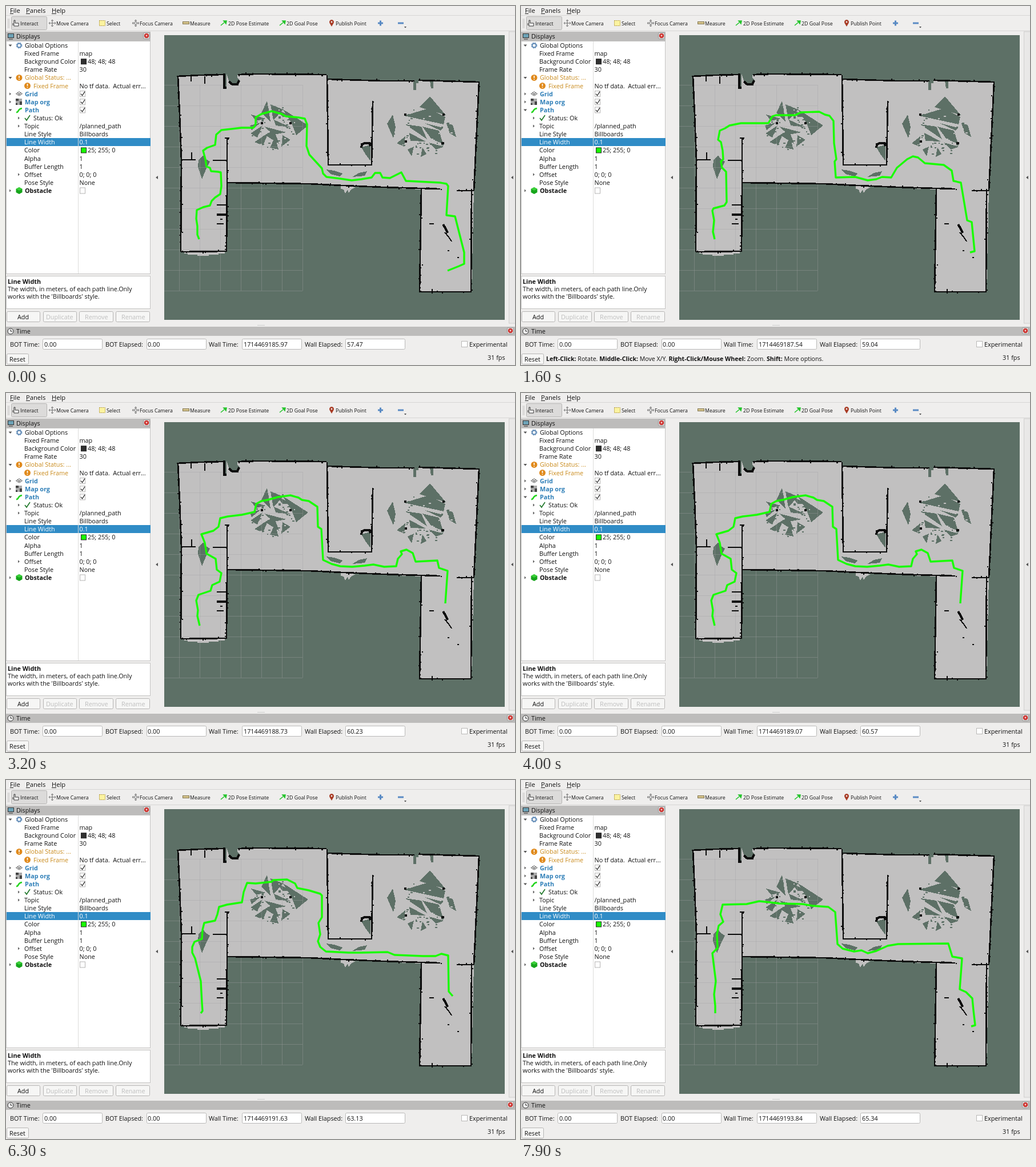
Recreate the animation shown at these times as an HTML page. Size 891x628 px, loop 8 s.

```html
<!DOCTYPE html>
<html lang="en">
<head>
<meta charset="utf-8">
<title>Planner view</title>
<style>
html, body { margin: 0; width: 100%; height: 100%; overflow: hidden; background: #efeeed; }
svg { display: block; }
text { font: 10.8px "Open Sans", "Noto Sans", sans-serif; fill: #111; white-space: pre; }
.tool { font-size: 8.8px; }
.b { font-weight: 700; }
.display { font-weight: 700; fill: #2f7fb8; }
.warn { fill: #c98a1b; }
.off { fill: #bebebe; }
.sel { fill: #fff; }
#floor { fill: #c1c0c0; }
#holes, .hole { fill: #5d7066; }
#walls path { fill: none; stroke: #0b0b0b; stroke-width: 2.6; }
#walls .thin { stroke-width: 2; }
#paths path { fill: none; stroke: #19ff00; stroke-width: 3.4; stroke-linejoin: round; visibility: hidden; }
</style>
</head>
<body>
<svg id="stage" width="891" height="628" viewBox="0 0 891 628">
<g id="ui"></g>
<rect x="277" y="51" width="596" height="498" fill="#5d7066"/>
<g shape-rendering="crispEdges">
  <g id="floor">
    <path d="M300 122L380 120V144H386V119L561 119L563 127L660 130L829 133L819 322L815 500H724L727 321L590 315L530 311L387 310L386 430H306L307 270Z"/>
    <path d="M312 430H383V433H372V435H355V437H335V435H318V433H312Z"/>
    <path d="M586 314L612 317L604 321L600 327L598 321L594 328L591 321L586 320Z"/>
  </g>
  <g id="holes">
    <path d="M386 118H406L405 125L409 130L404 138L396 137L390 131Z"/>
    <path d="M345 261L350 268L357 272L350 286L343 303L336 281L337 270Z"/>
    <path d="M560 286L574 288L589 293L584 298L568 294ZM632 289L628 297L606 299L618 292ZM622 247L638 243V271L629 259Z"/>
    <path d="M713 130H722V135H718V147H713ZM742 130H748V144H744Z"/>
    <path d="M457 166L463 202L447 187ZM463 172L485 181L468 200ZM474 180L502 195L484 194ZM484 180L529 209L508 226L500 205ZM429 190L455 197L438 201ZM427 209L446 204L430 217ZM428 223L449 209L440 230ZM452 211L491 221L468 225ZM454 226L469 216L478 241ZM469 199L498 212L472 209ZM435 238L459 222L450 244ZM462 248L471 229L477 251ZM482 246L484 226L498 234Z"/>
    <path d="M697 192L740 179L769 194L766 207ZM724 177L742 158L770 191ZM667 206L677 190L682 212L678 231ZM699 207L727 211L737 233ZM706 222L735 237L708 236ZM729 211L758 218L765 241L745 233ZM733 205L765 213L761 218ZM771 205L782 208L788 229L777 223ZM740 239L767 246L752 251ZM684 240L699 228L697 246ZM703 251L714 246L710 263ZM726 264L729 247L736 259Z"/>
  </g>
  <g id="specks"></g>
  <g id="grid" stroke="#a0a0a4" stroke-opacity=".38"></g>
  <g id="walls">
    <path d="M299 123L340 121L380 120M406 120L440 119L561 120"/>
    <path d="M301 122L304 190L307 270L306 430"/>
    <path d="M306 430L386 429"/>
    <path d="M387 230V310L386 430"/>
    <path d="M387 309L530 311L590 314L660 317L760 320"/>
    <path d="M562 121L564 278H640L642 166"/>
    <path d="M563 128L660 131H715M722 130L829 133"/>
    <path d="M828 133L819 323"/>
    <path d="M789 323H819"/>
    <path d="M727 320L724 500H814L815 323"/>
    <path class="thin" d="M348 123V136M324 123V132M325 256V269M306 269H332M362 270H387M369 348H386M369 381H381M375 373H379M383 231H391M741 381H749M746 495V500"/>
    <path style="stroke-width:4" d="M382 118V143H386M369 365H386M390 132L396 137H405L408 130"/>
    <path style="stroke-width:4" d="M622 248L623 242L628 240H636L638 245"/>
    <path style="stroke-width:4" d="M765 382L770 390L773 397"/>
    <path class="thin" d="M768 396L775 404L780 412M773 428H776M790 440H793M728 453H730M588 314H600V318"/>
    <path style="stroke-width:4" d="M446 205H450M496 205H500M697 190H701M764 190H768M698 237H702M762 240H767"/>
  </g>
</g>
<g id="paths">
  <path d="M338 408L335 400V385L333 372L334 357L345 352L357 349L360 341L366 335L375 329L377 315L376 291L371 290L359 289L357 283L351 281L349 268L345 253L352 248L366 243L368 225L377 217L395 215L412 213H433L437 207V195L447 189L465 184L483 189L490 193L512 195L523 197L527 207L526 245L531 260L553 284L555 293L561 299L585 302L605 305L622 303L640 300L646 292H655L659 300L672 301L692 291L700 306L760 309L771 311L774 315L771 366L786 368L802 431V451L793 455L773 463"/>
  <path d="M339 408L336 395L338 375L335 358L337 354L356 349L360 343L359 290L352 283L350 272L354 268L353 253L350 238L345 234L348 218L357 214L365 209L385 205H433L440 193L446 191H480L490 186L522 185L532 190L540 192L547 201L548 240L552 268L549 272L551 300L585 299L607 305L622 303L632 299L648 300L658 283L676 268L686 263L695 265L707 275L740 278L754 288L757 306L770 309L781 375L789 378L794 429L786 431"/>
  <path d="M339 407L335 390L336 372L335 350L344 343L342 320L339 300L332 283L342 278L344 262L342 252L349 246L355 241L373 236L374 217L385 212L411 209L436 214L447 219L470 216L481 221L486 239L488 245L495 254L517 260L530 265L557 291L565 300L585 303L597 299L607 305L622 303L634 296L645 293L667 284L683 273L693 259L705 251L717 250L735 261L759 269L767 300L770 318L768 360L775 365L777 375L790 379L793 428L787 431"/>
  <path d="M339 407L335 390L336 380L333 363L337 353L358 346L361 336L374 330L377 315L369 309L367 290L351 281L348 262L342 247L363 241L372 234L375 219L388 216L413 213L435 208L438 194L447 189L458 187L476 182L498 179L512 183L518 187L530 189L545 199L546 234L552 238L555 292L570 299L585 303L606 304L628 302L643 300L662 304L683 303L686 290L693 282L691 277L701 274L712 280L717 295L755 293L758 306L773 311L769 368"/>
  <path d="M338 407V380L339 363L345 352L339 330V315L337 300L349 292L352 262L349 240L341 230V215L349 200L364 197L400 196L437 194L450 190L467 191L471 200L470 232L485 237L492 246L517 258L537 270L550 274L556 287L571 299L591 296L607 291L630 292L655 299L665 288L673 275L685 263L718 264L725 279L765 278L778 287L780 378L789 381V398"/>
  <path d="M341 408L344 404L343 390L341 352L331 312L326 302V292L330 283L343 278L344 262L347 250L366 246L370 235L373 222L387 218L413 214L416 196L422 180L437 181L465 178L468 175L492 174L506 181L510 189L530 193L550 199L553 202V240L547 250L550 270L546 282L550 292L560 300L600 302H622L668 301L680 306L730 308H752L762 304L774 307L775 370L782 378"/>
  <path d="M340 408V395L338 375L341 352L337 320L335 303L344 294L343 270L346 255L354 248L349 235L353 218L395 217L417 212L436 214L452 216L493 217L510 220L538 222L550 231L554 287L563 295L583 300L596 298L607 303L622 299L642 290L660 287L748 286L755 309L772 312L768 366L779 371L790 382L792 403L795 429L788 431"/>
</g>
</svg>
<script>
const $ = id => document.getElementById(id);
const ui = $('ui');

function add(parent, tag, attrs, content) {
  const el = document.createElementNS('http://www.w3.org/2000/svg', tag);
  for (const k in attrs) el.setAttribute(k, attrs[k]);
  if (content) el.textContent = content;
  return parent.appendChild(el);
}
const text = (x, mid, s, cls = '') => add(ui, 'text', { x, y: mid + 4, class: cls }, s);
const rect = (x, y, width, height, fill, stroke = 'none', rx = 0) =>
  add(ui, 'rect', { x, y, width, height, fill, stroke, rx });
const shape = (d, fill, stroke = 'none', width = 1) =>
  add(ui, 'path', { d, fill, stroke, 'stroke-width': width });
const dot = (cx, cy, r, fill, stroke = 'none') => add(ui, 'circle', { cx, cy, r, fill, stroke });

const tick = (x, y) => shape(`M${x} ${y}l2.5 3 4.5 -7`, 'none', '#333', 1.3);
const button = (x, y, w, h, label, cls, lx) => {
  rect(x + .5, y + .5, w - 1, h - 1, '#f6f6f5', '#b6b5b4', 2);
  text(lx, y + h / 2, label, cls);
};
function closeIcon(x, y) {
  rect(x - 5.5, y - 5.5, 11, 11, '#dcdbda', '#999', 2);
  dot(x, y, 4, '#c9201c');
  shape(`M${x - 1.5} ${y - 1.5}l3 3m0 -3l-3 3`, 'none', '#fff', 1.2);
}
function titleBar(y, w, label) {
  rect(0, y, w, 16, '#bdbcbb');
  text(18, y + 8, label);
}
function arrowIcon(x) {
  shape(`M${x} 34l6 -5m-1 -3l5 0l-1 5z`, '#25c52c', '#25c52c', 1.6);
}

function drawMenu() {
  [[7, 'File', 6], [35, 'Panels', 7], [80, 'Help', 8]].forEach(([x, s, w]) => {
    text(x, 7.5, s).style.fontSize = '11.2px';
    shape(`M${x} 13.5h${w}`, 'none', '#222');
  });
  shape('M0 16.5H891M0 43.5H891', 'none', '#d6d5d4');
  shape('M3.5 22V39M5.5 22V39', 'none', '#c9c8c7', 1);
  rect(9.5, 18.5, 62, 23, '#dcdbda', '#b5b4b3', 2);
  [[25, 'Interact'], [88, 'Move Camera'], [176, 'Select'], [234, 'Focus Camera'], [322, 'Measure'],
   [389, '2D Pose Estimate'], [491, '2D Goal Pose'], [577, 'Publish Point']]
    .forEach(([x, s]) => text(x, 29.5, s, 'tool'));
  shape('M14 35V25h2v5h6v5zM12 30v4', '#fff', '#333');
  for (const x of [81, 227]) {
    shape(`M${x - 5} 30h10M${x} 25v10`, 'none', '#777', 1.2);
    shape(`M${x - 2} 26l2 -2 2 2M${x - 2} 34l2 2 2 -2M${x - 4} 28l-2 2 2 2M${x + 4} 28l2 2 -2 2`, 'none', '#777');
  }
  dot(227, 30, 2.5, '#ddd', '#777');
  rect(163.5, 25.5, 10, 9, '#fbf3a0', '#b59b3c').setAttribute('stroke-dasharray', '2 1');
  rect(309.5, 27.5, 11, 4, '#d6c48c', '#80744c');
  arrowIcon(376);
  arrowIcon(479);
  shape('M570 36l-3.5 -6a4 4 0 1 1 7 0z', '#a83a24');
  dot(570, 28, 1.4, '#efeeed');
  shape('M651 30h9M655.5 25.500v9M686 30h10', 'none', '#5a8bc4', 3);
  shape('M697 36h4l-2 2.500z', '#444');
}

function drawTree() {
  titleBar(45, 253, 'Displays');
  rect(3.5, 48.500, 10, 7, '#6da3b7', '#333');
  shape('M5 58h7', 'none', '#333');
  closeIcon(246, 52);
  rect(.5, 61.5, 252, 407, '#fff', '#c4c3c2');
  rect(1, 231, 252, 14, '#308cc6');
  shape('M126.5 62V468', 'none', '#dddcdb');
  const rows = [
    [33, 'Global Options'], [32, 'Fixed Frame', 'map'], [32, 'Background Color', '48; 48; 48'],
    [32, 'Frame Rate', '30'], [33, 'Global Status: ...', '', 'warn'],
    [48, 'Fixed Frame', 'No tf data.  Actual err...', 'warn'],
    [33, 'Grid', '', 'display'], [33, 'Map org', '', 'display'], [33, 'Path', '', 'display'],
    [48, 'Status: Ok'], [32, 'Topic', '/planned_path'], [32, 'Line Style', 'Billboards'],
    [32, 'Line Width', '0.1', 'sel'], [32, 'Color', '25; 255; 0'], [32, 'Alpha', '1'],
    [32, 'Buffer Length', '1'], [32, 'Offset', '0; 0; 0'], [32, 'Pose Style', 'None'], [33, 'Obstacle', '', 'display']
  ];
  const rowY = i => 69 + i * 14.11;
  rows.forEach(([x, name, value, cls], i) => {
    const swatch = { 2: '#303030', 13: '#19ff00' }[i];
    const label = text(x, rowY(i), name, cls);
    if (i === 18) label.style.fill = '#111';
    if (value) text(swatch ? 143 : 128.5, rowY(i), value, cls === 'sel' ? cls : '');
    if (swatch) rect(131.5, rowY(i) - 4.5, 9, 9, swatch, '#222');
  });
  [0, 4, 8].forEach(i => shape(`M4.500 ${rowY(i) - 1.5}h6l-3 3.500z`, '#555'));
  [[6, 6], [7, 6], [18, 6], [9, 21], [10, 21], [16, 21]]
    .forEach(([i, x]) => shape(`M${x} ${rowY(i) - 2.5}v5l3 -2.500z`, '#666'));
  [6, 7, 8, 18].forEach(i => {
    rect(129.5, rowY(i) - 5, 9, 10, '#fff', '#b5b4b3');
    if (i < 18) tick(131, rowY(i));
  });
  dot(23, 69, 3.5, 'none', '#5b87b4').setAttribute('stroke-width', 2);
  dot(23, 69, 5, 'none', '#5b87b4').setAttribute('stroke-dasharray', '2 2');
  [[23, 4], [37.5, 5]].forEach(([x, i]) => {
    dot(x, rowY(i), 5.5, '#e08a1c');
    shape(`M${x} ${rowY(i) - 3.5}v4m0 1.500v1.500`, 'none', '#fff', 1.6);
  });
  shape('M17.5 153.500l5.500 -3.500 5.500 3.500 -5.500 3.500zM20 152l5.500 3.500M26 152l-5.500 3.500', 'none', '#555');
  rect(17, 162, 11, 11, '#aaa');
  shape('M17 162h5v4h-5zM24 167h4v6h-4zM17 170h3v3h-3z', '#444');
  shape('M18 186c5 0 2 -6 10 -7', 'none', '#25d51f', 2.6);
  shape('M33 196l3 4 6 -9', 'none', '#237a2d', 1.7);
  shape('M23 317l5.500 3v6l-5.500 3 -5.500 -3v-6z', '#16a51b');
  shape('M23 317l5.500 3 -5.500 3 -5.500 -3z', '#3bd13a');

  rect(.5, 472.5, 252, 57, '#fff', '#c4c3c2');
  text(3, 482, 'Line Width', 'b');
  text(3, 495, 'The width, in meters, of each path line.Only');
  text(3, 507.5, "works with the 'Billboards' style.");
  button(1, 534, 59, 19, 'Add', '', 20);
  button(65, 534, 59, 19, 'Duplicate', 'off', 70);
  button(128, 534, 60, 19, 'Remove', 'off', 138);
  button(192, 534, 60, 19, 'Rename', 'off', 202);
  rect(880.5, 45, 11, 510, '#e9e8e7', '#d0cfce');
  shape('M266 297v6l-4 -3zM888 297v6l-4 -3z', '#555');
  shape('M440 558.500h13', 'none', '#ccc');
}

function drawTime() {
  titleBar(561, 891, 'Time');
  dot(8, 569, 5, '#eee', '#333');
  shape('M8 566v3h3', 'none', '#333');
  closeIcon(883, 568);
  [[7, 'BOT Time:', 64], [174, 'BOT Elapsed:', 246], [355, 'Wall Time:', 413], [523, 'Wall Elapsed:', 594]]
    .forEach(([x, s, box]) => {
      text(x, 592, s);
      rect(box + .5, 582.5, 104, 18, '#fff', '#b9b8b7', 2);
    });
  text(67, 591.5, '0.00');
  text(248, 591.5, '0.00');
  rect(797.5, 586.5, 10, 10, '#fff', '#b9b8b7');
  text(811, 592, 'Experimental');
  button(1, 608, 39, 19, 'Reset', '', 6);
  text(843, 615, '31 fps');
}

drawMenu();
drawTree();
drawTime();
const wall = text(416, 591.5, ' ');
const elapsed = text(597, 591.5, ' ');
const hint = text(44, 617, '');
['Left-Click:', ' Rotate. ', 'Middle-Click:', ' Move X/Y. ', 'Right-Click/Mouse Wheel:',
 ' Zoom. ', 'Shift:', ' More options.']
  .forEach((s, i) => add(hint, 'tspan', { class: i % 2 ? '' : 'b' }, s));
hint.style.fontSize = '10.6px';

for (let i = 0; i <= 10; i++) {
  const y = 138.5 + i * 36, x = 159.5 + i * 36;
  add($('grid'), 'path', { d: `M277 ${y}H519` });
  if (x > 277) add($('grid'), 'path', { d: `M${x} 138V498` });
}

// Seeded roughness along the walls and around the two tables.
let seed = 7;
const rand = () => (seed = seed * 16807 % 2147483647) / 2147483647;
const speck = (x, y, fill, w = 2, h = 2) =>
  add($('specks'), 'rect', { x: Math.round(x), y: Math.round(y), width: w, height: h, fill });
[...document.querySelectorAll('#walls path')].slice(0, 10).forEach(p => {
  const len = p.getTotalLength();
  for (let s = 0; s < len; s += 7) {
    const q = p.getPointAtLength(s + rand() * 5);
    if (rand() < .6) speck(q.x - 1 + (rand() - .5) * 5, q.y - 1 + (rand() - .5) * 5, '#0b0b0b');
  }
});
[[468, 213, 41, 39, 75], [727, 218, 52, 46, 55]].forEach(([cx, cy, rx, ry, n]) => {
  while (n--) {
    const a = rand() * Math.PI * 2, r = .45 + rand() * .55;
    speck(cx + Math.cos(a) * rx * r, cy + Math.sin(a) * ry * r, n % 4 ? '#5d7066' : '#c1c0c0', 2 + 3 * rand() | 0, 2);
  }
});

const clock = [[0, 185.97], [800, 186.74], [2500, 188.43], [4000, 189.07], [5100, 190.38], [6300, 191.63], [7900, 193.84]];
const plans = [[0, 0], [400, 1], [1800, 2], [3200, 3], [4200, 4], [5500, 5], [7000, -1], [7500, 6]];
const lines = [...document.querySelectorAll('#paths path')];

function wallAt(t) {
  const i = Math.max(1, clock.findIndex(k => k[0] >= t));
  const [t0, v0] = clock[i - 1], [t1, v1] = clock[i];
  return v0 + (v1 - v0) * (t - t0) / (t1 - t0);
}

const start = performance.now();
function draw(now) {
  const t = Math.floor(Math.max(0, now - start) % 8000 / 100) * 100;
  const v = wallAt(t);
  wall.textContent = (1714469000 + v).toFixed(2);
  elapsed.textContent = (v - 128.5).toFixed(2);
  const plan = plans.filter(p => p[0] <= t).pop()[1];
  lines.forEach((l, i) => l.style.visibility = i === plan ? 'visible' : 'hidden');
  hint.style.visibility = t >= 300 && t < 1800 ? 'visible' : 'hidden';
  requestAnimationFrame(draw);
}
draw(start);
</script>
</body>
</html>
```
